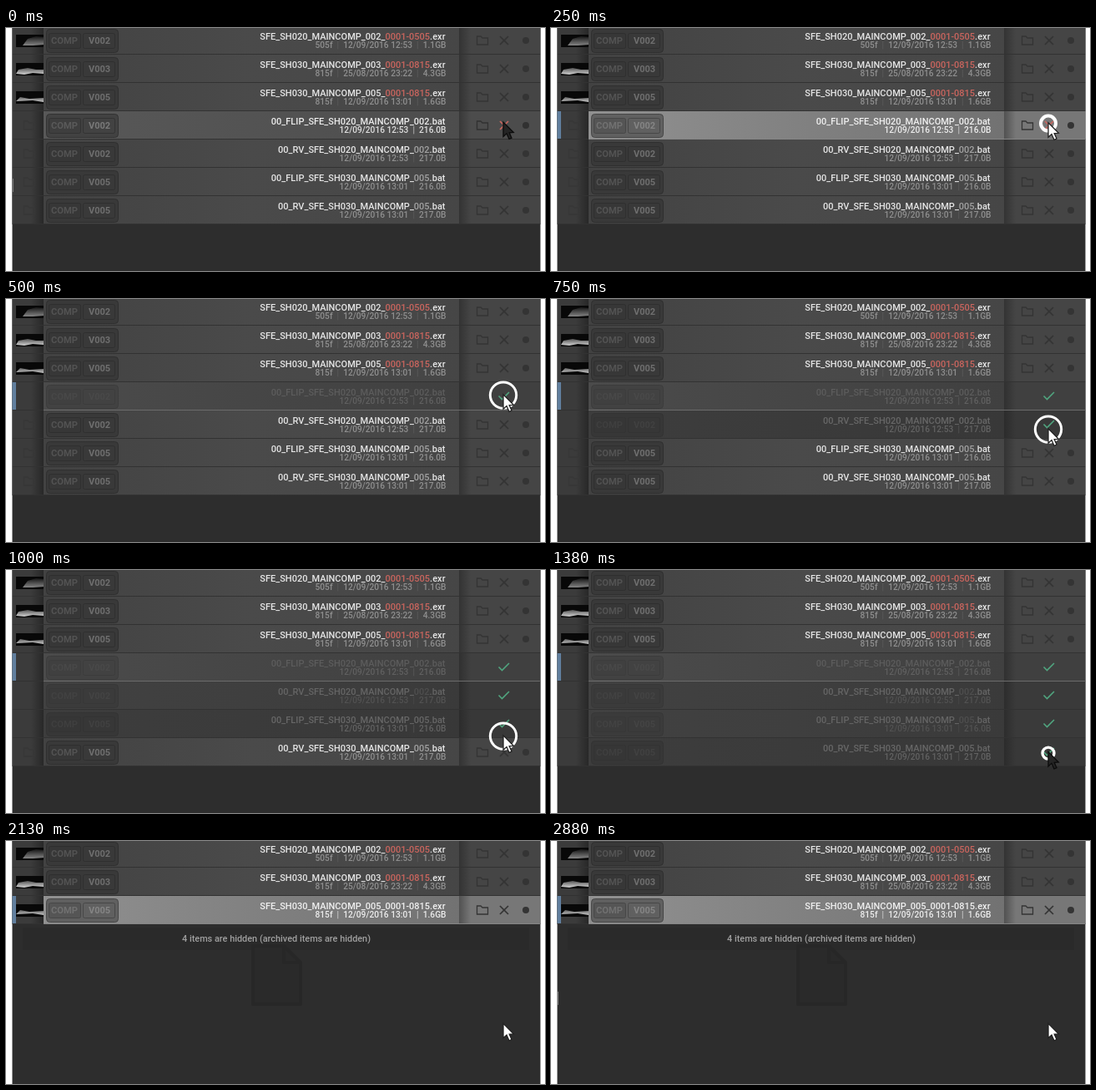
Write an HTML page with a canvas that moves like this. It is 646 by 292 pixels and loops after 3120 ms.

```html
<!DOCTYPE html>
<html lang="en">
<head>
<meta charset="utf-8">
<title>File list: archiving items</title>
<style>
html, body { margin: 0; width: 100%; height: 100%; overflow: hidden; background: #fff; }
canvas { display: block; width: 646px; height: 292px; }
</style>
</head>
<body>
<canvas id="stage" width="646" height="292"></canvas>
<script>
const ctx = document.getElementById('stage').getContext('2d');
const LOOP = 3120, ROW = 34, LEFT = 7.5, RIGHT = 640.5, BODY = 45, PANEL = 543;
const FONT = 'Roboto, sans-serif';
const RED = '#c9655e', GREEN = '#50a57f', BLUE = '#617f9e';

// Name pieces: stem, sequence part, extension.
const files = [
  { stem: 'SFE_SH020_MAINCOMP_002_', seq: '0001-0505', ext: '.exr', ver: 'V002', info: ['505f', '12/09/2016 12:53', '1.1GB'] },
  { stem: 'SFE_SH030_MAINCOMP_003_', seq: '0001-0815', ext: '.exr', ver: 'V003', info: ['815f', '25/08/2016 23:22', '4.3GB'] },
  { stem: 'SFE_SH030_MAINCOMP_005_', seq: '0001-0815', ext: '.exr', ver: 'V005', info: ['815f', '12/09/2016 13:01', '1.6GB'] },
  { stem: '00_FLIP_SFE_SH020_MAINCOMP_', seq: '002', ext: '.bat', ver: 'V002', info: ['12/09/2016 12:53', '216.0B'] },
  { stem: '00_RV_SFE_SH020_MAINCOMP_', seq: '002', ext: '.bat', ver: 'V002', info: ['12/09/2016 12:53', '217.0B'] },
  { stem: '00_FLIP_SFE_SH030_MAINCOMP_', seq: '005', ext: '.bat', ver: 'V005', info: ['12/09/2016 13:01', '216.0B'] },
  { stem: '00_RV_SFE_SH030_MAINCOMP_', seq: '005', ext: '.bat', ver: 'V005', info: ['12/09/2016 13:01', '217.0B'] }
];

// fill: body at its left edge, middle and right edge, then the icon panel.
const styles = {
  normal: { fill: ['#424242', '#4a4a4a', '#464646', '#454545'], name: '#e6e6e6', seq: '#a2a2a2', info: '#8f8f8f', bar: '#5a5a5a',
    box: '#393939', inner: '#373737', edge: '#2f2f2f', comp: '#535353', ver: '#6f6f6f', icon: '#343434' },
  hover: { fill: ['#585858', '#535353', '#4d4d4d', '#4c4c4c'], name: '#ececec', info: '#dedede', bar: '#bbb',
    box: '#424242', inner: '#3e3e3e', edge: '#333', comp: '#5a5a5a', ver: '#7a7a7a', icon: '#313131' },
  selected: { fill: ['#919191', '#818181', '#727272', '#777'], name: '#f0f0f0', info: '#ededed', bar: '#ccc', line: '#858585',
    box: '#606060', inner: '#555', edge: '#474747', comp: '#717171', ver: '#858585', icon: '#343434' },
  archived: { fill: ['#414141', '#3f3f3f', '#3a3a3a', '#3a3a3a'], name: '#656565', seq: '#4e4e4e', info: '#525252', bar: '#484848',
    box: '#3b3b3b', inner: '#3a3a3a', edge: '#373737', comp: '#424242', ver: '#444' },
  archivedHover: { fill: ['#3d3d3d', '#3b3b3b', '#383838', '#383838'], name: '#676767', info: '#626262', bar: '#555',
    box: '#373737', inner: '#363636', edge: '#333', comp: '#3f3f3f', ver: '#414141' },
  archivedSelected: { fill: ['#4b4b4b', '#464646', '#404040', '#404040'], name: '#5c5c5c', info: '#606060', bar: '#595959', line: '#6b6b6b',
    box: '#424242', inner: '#404040', edge: '#3c3c3c', comp: '#484848', ver: '#494949' }
};

// Light shapes in the preview pictures, from the top left of each picture.
const thumbShapes = [
  [[8, 13], [14, 5], [24, 2], [33, 3], [33, 12], [20, 13]],
  [[0, 13], [3, 8], [14, 6], [24, 8], [33, 8], [33, 13], [20, 12], [10, 14]],
  [[0, 12], [5, 7], [16, 9], [33, 8], [33, 13], [20, 11]]
];

function rect(x, y, w, h, color) {
  ctx.fillStyle = color;
  ctx.fillRect(x, y, w, h);
}

function gradient(x0, y0, x1, y1, colors) {
  const g = ctx.createLinearGradient(x0, y0, x1, y1);
  colors.forEach((c, i) => g.addColorStop(i / (colors.length - 1), c));
  return g;
}

function fade(x, y, w, h, colors) {
  rect(x, y, w, h, gradient(x, 0, x + w, 0, colors));
}

function roundBox(x, y, w, h, r, fill, edge) {
  ctx.beginPath();
  ctx.roundRect(x, y, w, h, r);
  ctx.fillStyle = fill;
  ctx.fill();
  ctx.strokeStyle = edge;
  ctx.lineWidth = 1;
  ctx.stroke();
}

function trace(points, closed) {
  ctx.beginPath();
  points.forEach(([x, y]) => ctx.lineTo(x, y));
  if (closed) ctx.closePath();
}

function line(points, color, width, closed) {
  trace(points, closed);
  ctx.strokeStyle = color;
  ctx.lineWidth = width;
  ctx.stroke();
}

function shape(points, fill) {
  trace(points, true);
  ctx.fillStyle = fill;
  ctx.fill();
}

function disc(x, y, r, color) {
  ctx.beginPath();
  ctx.arc(x, y, r, 0, 7);
  ctx.fillStyle = color;
  ctx.fill();
}

function label(text, x, y, size, color, align = 'center', weight = 700) {
  ctx.font = `${weight} ${size}px ${FONT}`;
  ctx.textAlign = align;
  ctx.fillStyle = color;
  ctx.fillText(text, x, y);
}

// Draws [text, color] pieces so that the last one ends at x.
function rightAligned(pieces, x, y, size, weight) {
  for (const [text, color] of pieces.reverse()) {
    label(text, x, y, size, color, 'right', weight);
    x -= ctx.measureText(text).width;
  }
}

function drawFolder(x, cy, color) {
  line([[x - 6.5, cy - 5], [x - 2, cy - 5], [x, cy - 3], [x + 6.5, cy - 3], [x + 6.5, cy + 5], [x - 6.5, cy + 5]], color, 1.3, true);
}

function drawThumb(index, top, isArchived) {
  rect(LEFT, top, BODY - LEFT, 33, '#3b3b3b');
  fade(30, top, 15, 33, ['rgba(30,30,30,0)', 'rgba(30,30,30,.65)']);
  if (index < thumbShapes.length) {
    const y = top + 10;
    rect(12, y, 33, 15, '#080808');
    ctx.save();
    ctx.translate(12, y);
    shape(thumbShapes[index], gradient(0, 2, 0, 13, ['#161616', index ? '#c4c4c4' : '#858585']));
    ctx.restore();
  } else if (!isArchived) {
    drawFolder(28, top + 17, '#373737');
  }
}

function drawBadge(top, s, version) {
  roundBox(48.5, top + 3.5, 86, 28, 4, s.box, s.edge);
  roundBox(51.5, top + 8.5, 38, 18, 2, s.inner, s.edge);
  roundBox(92.5, top + 8.5, 38, 18, 2, s.box, s.edge);
  label('COMP', 70, top + 21, 11.2, s.comp);
  label(version, 112, top + 21, 11, s.ver);
}

function drawIcons(cy, color, cross) {
  drawFolder(571, cy, color);
  line([[592, cy - 5], [602, cy + 5]], cross, 1.7);
  line([[602, cy - 5], [592, cy + 5]], cross, 1.7);
  disc(623, cy, 4, color);
}

function drawRow(index, state, hovered) {
  const f = files[index], s = styles[state], top = index * ROW - 2, cy = top + 17;
  const isSelected = /selected/i.test(state), isArchived = state.startsWith('archived');
  drawThumb(index, top, isArchived);
  fade(BODY, top, PANEL - BODY, 33, s.fill.slice(0, 3));
  rect(PANEL, top, RIGHT - PANEL, 33, s.fill[3]);
  fade(PANEL, top, 14, 33, ['rgba(25,25,25,.4)', 'rgba(25,25,25,0)']);
  rect(LEFT, top + 33, RIGHT - LEFT, 1, '#323232');
  if (isSelected) {
    rect(BODY, top + 33, RIGHT - BODY, 1, s.line);
    rect(LEFT, top, 12 - LEFT, 33, BLUE);
  }

  drawBadge(top, s, f.ver);
  const seqColor = state === 'normal' && index < 3 ? RED : s.seq || s.name;
  rightAligned([[f.stem, s.name], [f.seq, seqColor], [f.ext, s.name]], 526.5, top + 16, 11, 500);
  const info = [];
  f.info.forEach((part, i) => {
    if (i) info.push(['  |  ', s.bar]);
    info.push([part, s.info]);
  });
  rightAligned(info, 527.5, top + 26, 10.2, 500);

  if (isArchived) line([[590.5, cy - 0.5], [594.5, cy + 3.5], [603, cy - 5]], GREEN, 1.6);
  else drawIcons(cy, s.icon, hovered ? RED : s.icon);
}

function drawHiddenNotice() {
  rect(20, 104, 607, 27, '#2a2a2a');
  const page = [[296, 126], [333, 126], [353, 146], [353, 196], [296, 196]];
  ctx.lineJoin = 'round';
  shape(page, '#2a2a2a');
  line(page, '#272727', 4, true);
  line([[333, 126], [333, 146], [353, 146]], '#272727', 4);
  ctx.lineJoin = 'miter';
  label('4 items are hidden (archived items are hidden)', 324, 121, 10.9, '#a0a0a0', 'center', 500);
}

function drawPointer(y, dark) {
  const arrow = [[0, 0], [0, 17.5], [4, 13.8], [7, 20.5], [10, 19.2], [7.2, 12.8], [12.3, 12.5]];
  ctx.save();
  ctx.translate(596, y);
  shape(arrow, dark ? '#242424' : '#fff');
  line(arrow, dark ? '#0c0c0c' : '#222', 1.3, true);
  ctx.restore();
}

// Click ring as [radius, line width, opacity].
function ringAt(step) {
  if (step === 2) return [9, 4, 1];
  if (step >= 3 && step <= 10) return [15.7, 3, 1];
  if (step === 11 || step === 12) return [7, 3.4, 1];
  if (step >= 13 && step <= 15) {
    const k = step - 13;
    return [20 + 2.2 * k, 1.5, 1 - 0.35 * k];
  }
  return null;
}

function pointerY(step) {
  const path = [113, 114, 134, 155, 177, 198, 212, 218.5];
  return path[Math.max(0, Math.min(step - 3, path.length - 1))];
}

function rowState(index, step, hovered) {
  if (step >= 13) return index === 2 ? 'selected' : 'normal';
  const archivedFrom = [4, 6, 7, 9][index - 3];
  if (step >= archivedFrom) return index === 3 ? 'archivedSelected' : hovered ? 'archivedHover' : 'archived';
  if (index === 3) return step < 2 ? 'hover' : 'selected';
  return 'normal';
}

function draw(time) {
  let step = Math.floor(time / 125);
  if (time < Math.round(step * 12.5) * 10) step--;
  const y = pointerY(step), finished = step >= 13;
  const hoveredRow = Math.floor((y + 2) / ROW);

  rect(0, 0, 646, 292, '#fff');
  rect(LEFT, 0, RIGHT - LEFT, 292, '#2d2d2d');
  for (let i = 0; i < (finished ? 3 : files.length); i++) {
    const hovered = !finished && i === hoveredRow;
    drawRow(i, rowState(i, step, hovered), hovered);
  }
  if (finished) drawHiddenNotice();
  if (step < 1 || step >= 23) rect(8, 181, 1, 16, '#777');

  const ring = ringAt(step);
  if (ring) {
    ctx.globalAlpha = ring[2];
    ctx.beginPath();
    ctx.arc(596, y + 1.6, ring[0], 0, 7);
    ctx.strokeStyle = '#fff';
    ctx.lineWidth = ring[1];
    ctx.stroke();
    ctx.globalAlpha = 1;
  }
  const dark = step < 2 || step === 11 || step === 12;
  drawPointer(dark ? y : y + 0.8, dark);
}

const start = performance.now();
function tick() {
  draw((performance.now() - start) % LOOP);
  requestAnimationFrame(tick);
}
tick();
</script>
</body>
</html>
```
